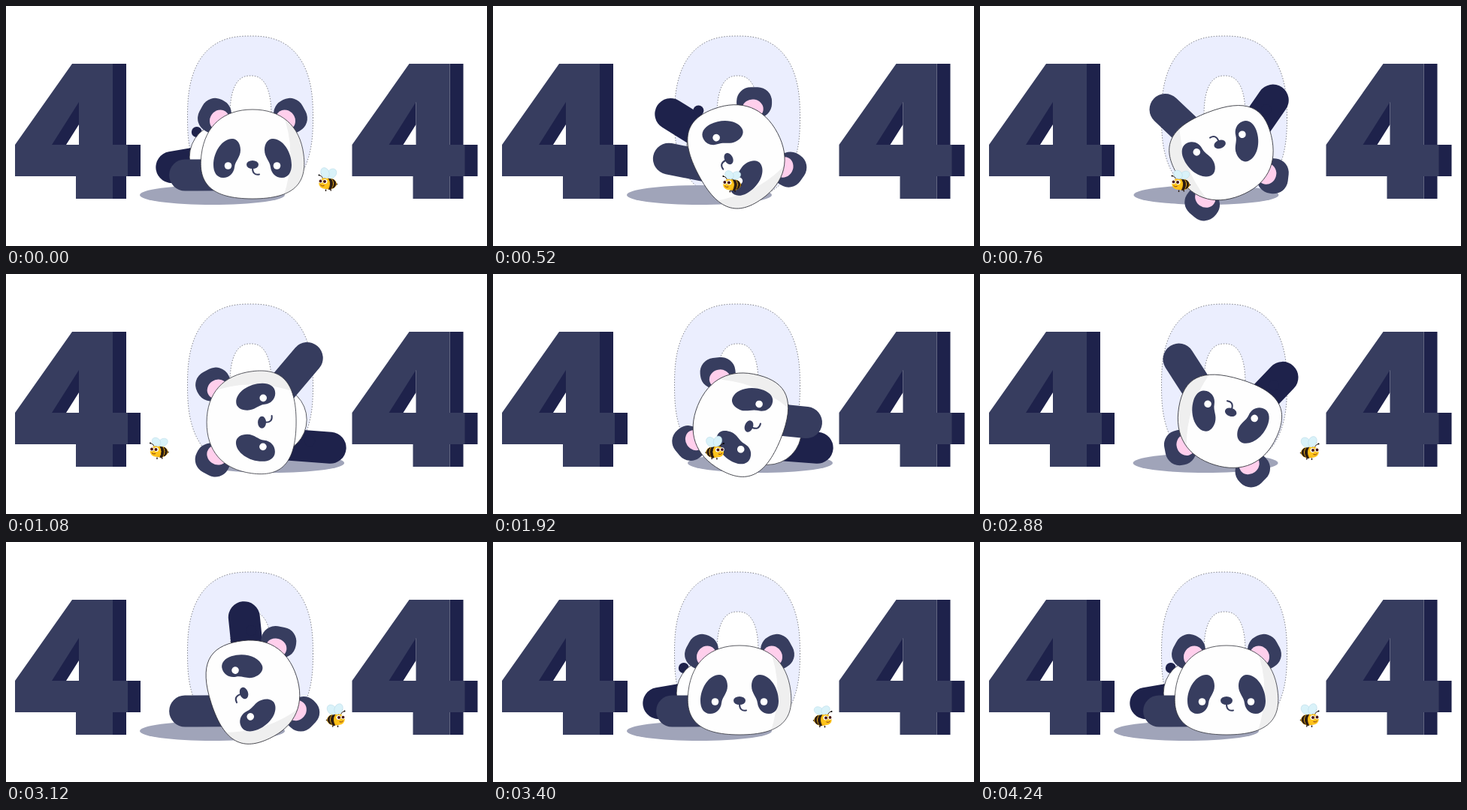
An HTML page for the animation above (4280 ms loop, 640 px wide and 320 px high).

```html
<!DOCTYPE html>
<html lang="en">
<head>
<meta charset="utf-8">
<title>404</title>
<style>
  html, body { margin: 0; width: 100%; height: 100%; overflow: hidden; background: #fff; }
  svg { display: block; width: 640px; height: 320px; }
  .front { fill: #373d5f; }
  .side { fill: #1e224b; }
  .leg { fill: none; stroke-width: 42; stroke-linecap: round; }
  .line { stroke: #33343c; stroke-width: .8; }
</style>
</head>
<body>
<svg viewBox="0 0 640 320">
  <defs>
    <g id="four">
      <path class="side" d="M142 77H160V185H179V227H160V257H142ZM97 126L60 185H80L97 158Z"/>
      <path class="front" fill-rule="evenodd"
        d="M88 77H142V185H162V227H142V257H93V227H12V185ZM97 128L61 185H97Z"/>
    </g>
    <path id="skull" d="M0-60C38-60 63-39 68 0C73 38 56 59 0 59C-56 59-73 38-68 0C-63-39-38-60 0-60Z"/>
    <clipPath id="face"><use href="#skull"/></clipPath>
    <g id="ear">
      <rect class="front" x="-71" y="-75" width="41" height="47" rx="19" transform="rotate(28 -50.5 -51.5)"/>
      <ellipse cx="-44" cy="-46" rx="12.5" ry="14" fill="#ffcfec" transform="rotate(35 -44 -46)"/>
    </g>
    <g id="eye">
      <path class="front" d="M-27-21C-20-21-16-14-16-6C-16 4-23 8-24 17C-25 25-31 31-39 31C-48 31-52 23-52 14C-52-4-40-21-27-21Z"/>
      <circle cx="-32.5" cy="15" r="4.8" fill="#fff"/>
    </g>
  </defs>

  <use href="#four"/>
  <use href="#four" x="448.5"/>
  <path id="zero" fill="#ebeefe" fill-rule="evenodd" stroke="#33343c" stroke-width=".6" stroke-dasharray="1.5 2"/>
  <ellipse id="shadow" cy="252" rx="96.5" ry="13" fill="#a0a4b9"/>

  <path id="dark" class="leg" stroke="#1e224b"/>
  <circle id="tail" class="side" r="7"/>
  <circle id="body" class="line" r="45" fill="#fff"/>
  <path id="light" class="leg" stroke="#363c5e"/>

  <g id="head">
    <use href="#ear"/>
    <use href="#ear" transform="scale(-1 1)"/>
    <use href="#skull" fill="#fefefe"/>
    <path d="M38-60Q62-4 40 60H80V-60Z" fill="#efefef" clip-path="url(#face)"/>
    <use href="#skull" fill="none" class="line"/>
    <use href="#eye"/>
    <use href="#eye" transform="scale(-1 1)"/>
    <ellipse class="front" cy="13.5" rx="8" ry="5.5"/>
    <path d="M0 18Q0 28 9 26.5" fill="none" stroke="#373d5f" stroke-width="2" stroke-linecap="round"/>
  </g>

  <g id="bee">
    <path d="M-9 3L-13 6L-9 9Z" fill="#2a1b12"/>
    <path d="M-3 12l-1 3M3 13v2.5" stroke="#2a1b12" stroke-width="1.4"/>
    <ellipse cx="-1" cy="5.5" rx="10.5" ry="7.5" fill="#f7b512"/>
    <path d="M-6-.5Q-10 5-6 11.5L-8.5 10Q-12 5-8.5 1ZM-1-1.5Q-5 5-1 13L-4 12.5Q-8 5-4-1Z" fill="#2a1b12" stroke="#2a1b12"/>
    <circle cx="5" cy="5" r="7.2" fill="#fdc31b"/>
    <path d="M4-2Q4-7 8-8M7-2Q9-6 12-6" fill="none" stroke="#2a1b12" stroke-width="1"/>
    <circle cx="12" cy="-6" r="1"/><circle cx="8" cy="-8" r="1"/>
    <circle cx="4" cy="2.5" r="3" fill="#fff"/><circle cx="10" cy="2" r="2.8" fill="#fff"/>
    <circle cx="4.5" cy="2.5" r="2" fill="#4a1712"/><circle cx="10" cy="2" r="1.9" fill="#4a1712"/>
    <path d="M5 8Q8 9.5 10 7" fill="none" stroke="#8a3c10"/>
    <g id="wings" fill="#d9f2f9" stroke="#b5d8e6" stroke-width=".5">
      <ellipse cx="-5" cy="-8" rx="5.6" ry="7.2" transform="rotate(-40 -5 -8)"/>
      <ellipse cx="4" cy="-9" rx="5.4" ry="7.2" transform="rotate(25 4 -9)"/>
    </g>
  </g>
</svg>
<script>
const LOOP = 4280, STEP = 40, CX = 328, CY = 198;
const $ = id => document.getElementById(id);

const clamp = u => Math.min(1, Math.max(0, u));
const mix = (a, b, p) => a + (b - a) * p;
const swing = u => (1 - Math.cos(Math.PI * u)) / 2;
const drop = u => u * u;
const linear = u => u;
const arch = p => Math.sin(Math.PI * p);

// 0 at rest on the left, 1 after rolling over; each roll has a start and an end.
function roll(t, ease, out, back) {
  const part = ([from, to]) => ease(clamp((t - from) / (to - from)));
  return part(out) - part(back);
}

const polar = (deg, r) => {
  const a = deg * Math.PI / 180;
  return [CX + r * Math.cos(a), CY + r * Math.sin(a)];
};

function oval(cx, cy, rx, ry) {
  const bend = v => Math.sign(v) * Math.abs(v) ** 0.8;
  const pts = Array.from({ length: 120 }, (_, i) => {
    const a = i * Math.PI / 60;
    return (cx + rx * bend(Math.cos(a))).toFixed(2) + ' ' + (cy + ry * bend(Math.sin(a))).toFixed(2);
  });
  return 'M' + pts.join('L') + 'Z';
}
$('zero').setAttribute('d', oval(325, 148.5, 83.5, 108.5) + oval(325.5, 148.5, 27.5, 55.5));

function place(id, [x, y]) {
  $(id).setAttribute('cx', x);
  $(id).setAttribute('cy', y);
}

function drawLeg(id, angle, reach, hip) {
  const [x, y] = polar(angle, reach);
  $(id).setAttribute('d', `M${CX} ${CY + hip}L${x} ${y}`);
}

function drawPanda(t) {
  // The far leg leads on the way out, the near leg on the way back.
  const far = roll(t, drop, [247, 872], [2307, 3400]);
  const near = roll(t, drop, [276, 1206], [2200, 3047]);
  const turn = roll(t, swing, [190, 1270], [2553, 3400]);
  const slide = roll(t, swing, [520, 1140], [2570, 3070]);

  const farAngle = mix(171, 378, far), nearAngle = mix(163, 360, near);
  drawLeg('dark', farAngle, 109 - 24 * far * arch(far), mix(-2, 26, far));
  drawLeg('light', nearAngle, mix(94, 89, near) + 42 * near * arch(near), mix(27, -9, near));

  const mid = (far + near) / 2;
  place('body', polar((farAngle + nearAngle) / 2 + 8, 39 - 30 * arch(mid)));
  place('tail', polar(farAngle + 31 * (1 - far) ** 3, 80));
  $('shadow').setAttribute('cx', mix(274.5, 355.5, slide));

  const lean = (t < LOOP / 2 ? -4 : 2) * arch(turn);
  $('head').setAttribute('transform',
    `translate(${CX + lean} ${CY - arch(turn)}) rotate(${292 * turn})`);
}

function drawBee(t) {
  const out = clamp(t / 1060), home = clamp((t - 1668) / 650);
  const x = 428.5 - 224.5 * out + 234.5 * home;
  const y = 231.5 + 1.5 * arch(t / 1070) ** 2;
  $('bee').setAttribute('transform', `translate(${x} ${y}) scale(${home > 0 ? 1 : -1} 1)`);
  const flap = Math.round(t / STEP) % 2 ? 0.82 : 1;
  $('wings').setAttribute('transform', `translate(0 -2) scale(1 ${flap}) translate(0 2)`);
}

const start = performance.now();
function tick() {
  const now = (performance.now() - start) % LOOP;
  const t = Math.floor(now / STEP) * STEP;
  drawPanda(t);
  drawBee(t);
  requestAnimationFrame(tick);
}
tick();
</script>
</body>
</html>
```
